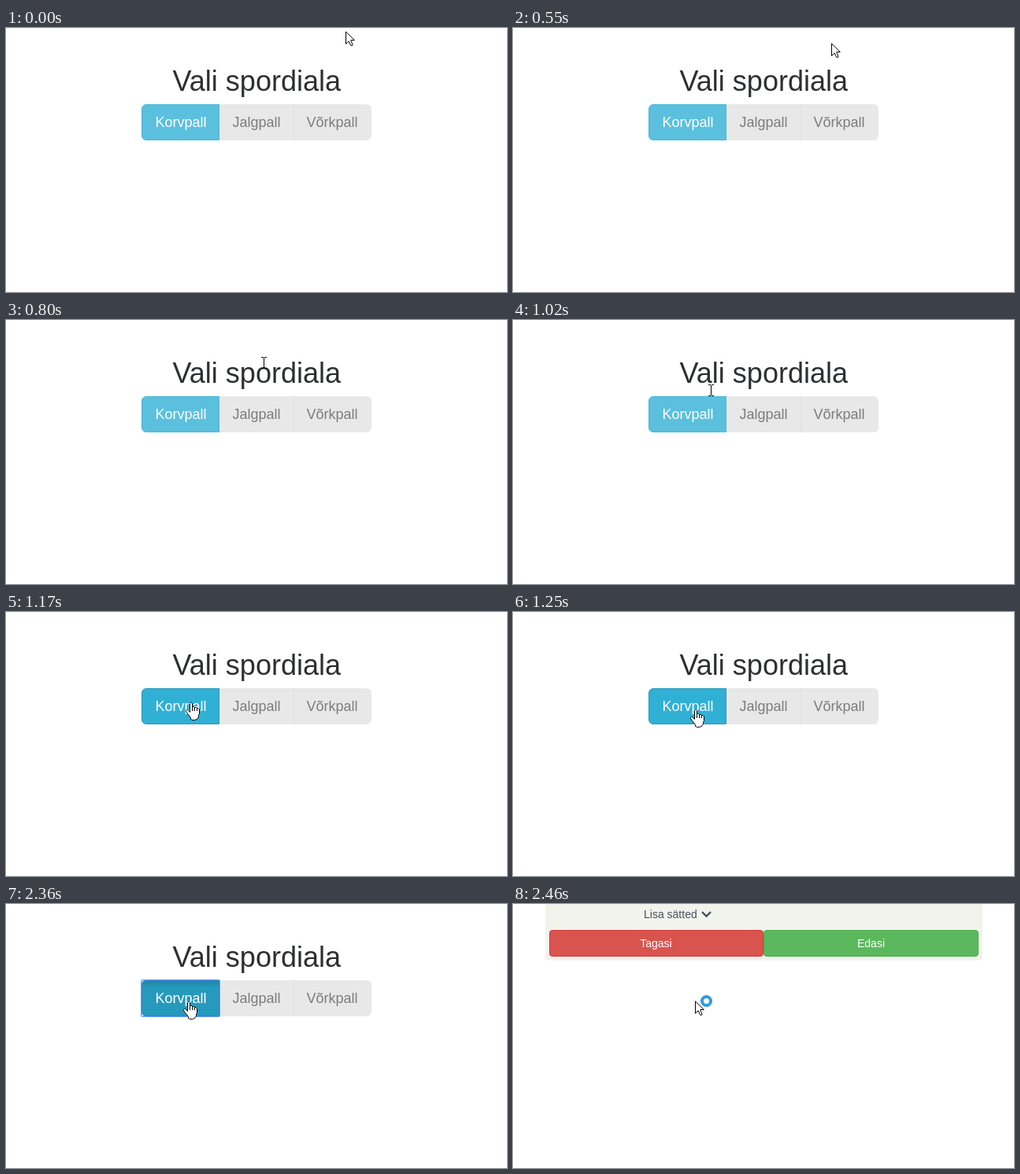
An HTML page that plays this animation: 636 px wide and 336 px high, repeating every 3.11 s.

```html
<!DOCTYPE html>
<html lang="et">
<head>
<meta charset="utf-8">
<title>Vali spordiala</title>
<style>
  html, body { margin: 0; width: 100%; height: 100%; overflow: hidden; background: #fff; }
  svg { display: block; width: 636px; height: 336px; }
  text { font-family: "Liberation Sans", Arial, sans-serif; }
  .title { font-size: 36px; fill: #2e2f30; }
  .large { font-size: 18px; }
  .small { font-size: 14px; }
  .muted { fill: #7c7c7c; }
  .light { fill: #fff; }

  /* Every change is a hard step on one shared loop. */
  .choose, .result, .choice, .pressed, .pointer, .arrow, .beam, .hand, .busy {
    animation: 3110ms step-end infinite;
  }
  .choose  { animation-name: choose; }
  .result  { animation-name: result; }
  .choice  { animation-name: choice; }
  .pressed { animation-name: pressed; }
  .pointer { animation-name: move; }
  .arrow   { animation-name: arrow; }
  .beam    { animation-name: beam; }
  .hand    { animation-name: hand; }
  .busy    { animation-name: result; }

  @keyframes choose { 0% { opacity: 1 } 79.1%, 100% { opacity: 0 } }
  @keyframes result { 0% { opacity: 0 } 79.1%, 100% { opacity: 1 } }
  @keyframes pressed { 0% { opacity: 0 } 75.884% { opacity: 1 } 79.1%, 100% { opacity: 0 } }
  @keyframes choice {
    0% { fill: #5bc0de; stroke: #46b8da }
    35.37% { fill: #31b0d5; stroke: #269abc }
    75.884%, 100% { fill: #269abc; stroke: #1b6d85 }
  }
  @keyframes arrow { 0% { opacity: 1 } 25.402% { opacity: 0 } 79.1%, 100% { opacity: 1 } }
  @keyframes beam { 0% { opacity: 0 } 25.402% { opacity: 1 } 35.37%, 100% { opacity: 0 } }
  @keyframes hand { 0% { opacity: 0 } 35.37% { opacity: 1 } 79.1%, 100% { opacity: 0 } }
  @keyframes move {
    0%      { transform: translate(431px, 4px) }
    17.685% { transform: translate(404px, 19px) }
    20.257% { transform: translate(379px, 30px) }
    22.83%  { transform: translate(353px, 42px) }
    25.402% { transform: translate(327px, 54px) }
    27.653% { transform: translate(302px, 66px) }
    30.225% { transform: translate(276px, 78px) }
    32.797% { transform: translate(251px, 89px) }
    35.37%  { transform: translate(239px, 102px) }
    37.621% { transform: translate(233px, 115px) }
    40.193% { transform: translate(230px, 124px) }
    79.1%, 100% { transform: translate(231px, 123px) }
  }
</style>
</head>
<body>
<svg viewBox="0 0 636 336">
  <defs>
    <linearGradient id="inset" x2="0" y2="1">
      <stop stop-opacity=".125"/>
      <stop offset=".35" stop-opacity=".09"/>
      <stop offset="1" stop-opacity="0"/>
    </linearGradient>
  </defs>

  <g class="choose">
    <text class="title" x="211.5" y="80">Vali spordiala</text>

    <path d="M271 97H458a6 6 0 0 1 6 6v34a6 6 0 0 1-6 6H271Z" fill="#e8e8e8"/>
    <path d="M365.5 97v46" stroke="#dfdfdf"/>
    <path class="choice" d="M270.5 97.5H178a5.5 5.5 0 0 0-5.5 5.5v34a5.5 5.5 0 0 0 5.5 5.5H270.5Z"/>
    <g class="pressed">
      <path d="M270 98H178a5 5 0 0 0-5 5v3H270Z" fill="url(#inset)"/>
      <rect x="171.5" y="96.5" width="100" height="47" rx="1.5" fill="none" stroke="#4d90fe" stroke-opacity=".85"/>
      <rect x="172.5" y="97.5" width="98" height="45" rx="1.5" fill="none" stroke="#4d90fe" stroke-opacity=".6"/>
    </g>

    <text class="large light" x="189.5" y="126">Korvpall</text>
    <text class="large muted" x="287.5" y="126">Jalgpall</text>
    <text class="large muted" x="381.5" y="126">Võrkpall</text>
  </g>

  <g class="result">
    <path d="M41 0H596V68a4 4 0 0 1-4 4H45a4 4 0 0 1-4-4Z" fill="#f3f3ee"/>
    <text class="small" x="166" y="18" fill="#465257">Lisa sätted</text>
    <path d="M240 10.2l5.5 5.3 5.5-5.3" fill="none" stroke="#465257" stroke-width="2.4"/>
    <rect x="46.5" y="33.5" width="271" height="33" rx="3.5" fill="#d9534f" stroke="#d43f3a"/>
    <rect x="318.5" y="33.5" width="272" height="33" rx="3.5" fill="#5cb85c" stroke="#4cae4c"/>
    <g class="small light" text-anchor="middle">
      <text x="181.5" y="55">Tagasi</text>
      <text x="454.5" y="55">Edasi</text>
    </g>
  </g>

  <g class="pointer" fill="#fff" stroke="#000">
    <path class="arrow" d="M.5 .8V16.3L4.2 12.8 6.6 18.2 8.7 18.3 9 17.2 6.9 12.3V11.5H11.3Z"/>
    <path class="beam" d="M-3 -6.5H0M1 -6.5H4M.5 -6V7M-3 7.5H0M1 7.5H4" fill="none"/>
    <g class="hand">
      <path d="M.5 12.5V1.5L1.5 .5H2.5L3.5 1.5V5.5H5.5L6.5 6.5H8.5L9.5 7.5H11L12.5 9V14.5L11.5 16.5V18.5L9.5 21.5 6.5 22.5H3.5L1.5 21.5V19.5L-2.5 14.5 -4.5 11.5V10.5L-3.5 9.5H-2.5Z"/>
      <path d="M3.5 5.5V11M6.5 6.5V11M9.5 7.5V11" fill="none"/>
    </g>
    <circle class="busy" cx="14.5" cy=".5" r="5.5" stroke="#2f9be0" stroke-width="4"/>
  </g>
</svg>
</body>
</html>
```
